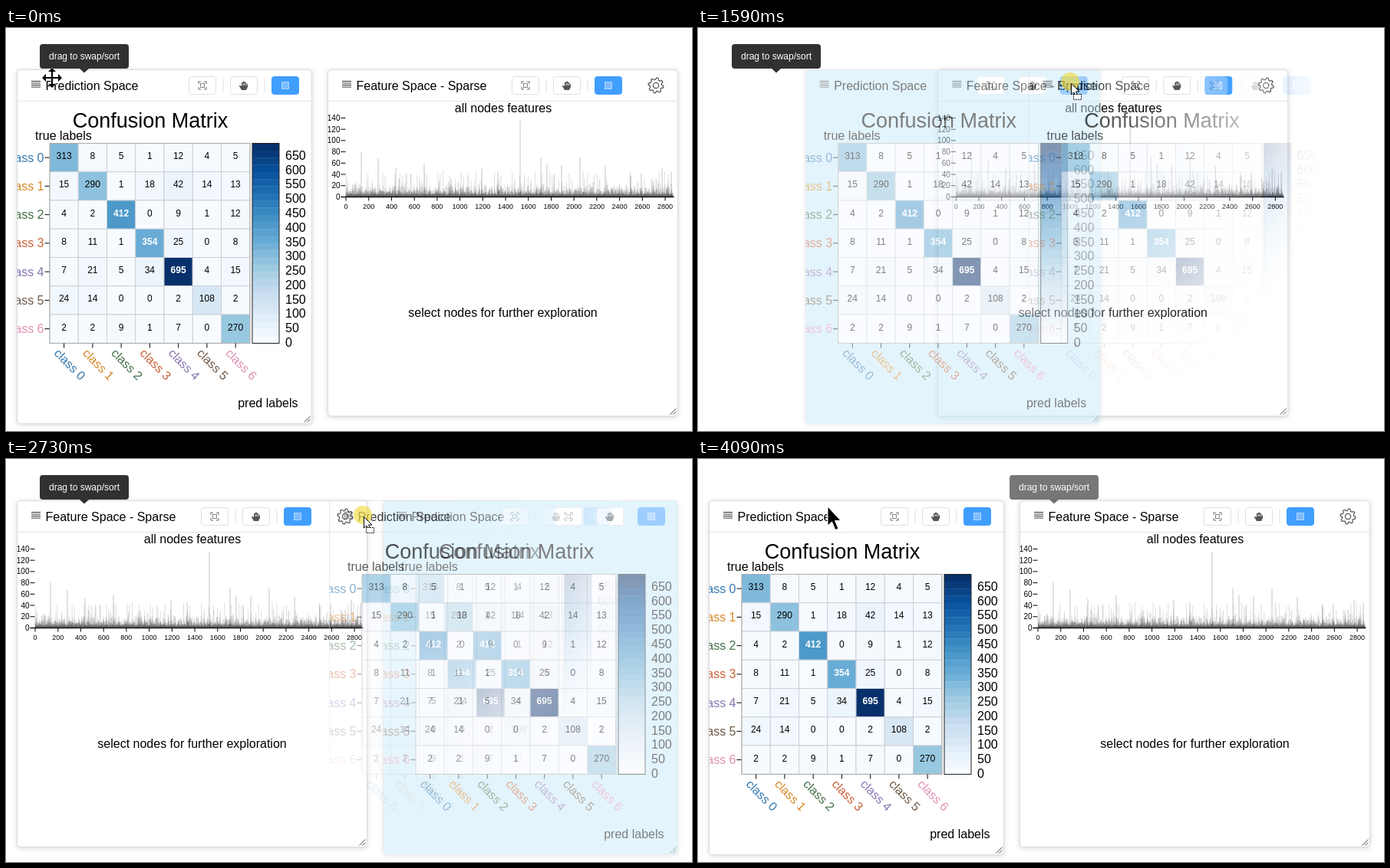
Write an HTML page that moves like this. It is 894 by 526 pixels and loops after 4160 ms.

```html
<!DOCTYPE html>
<html lang="en">
<head>
<meta charset="utf-8">
<title>Swapping dashboard panels</title>
<style>
  html, body { margin: 0; width: 100%; height: 100%; overflow: hidden; background: #fff; }
  svg { display: block; width: 894px; height: 526px; font-family: "Liberation Sans", Arial, sans-serif; }
  .card { fill: #fff; stroke: #d9dbe0; filter: drop-shadow(0 1px 3px rgba(0, 0, 0, .16)); }
  .dragged { opacity: .5; }
  .dragged .card { fill: #c8ebfb; }
  #ghost .card { fill: none; filter: none; }
</style>
</head>
<body>
<svg id="stage" viewBox="0 0 894 526">
  <defs>
    <clipPath id="clipA"><rect width="384" height="462"/></clipPath>
    <clipPath id="clipB"><rect width="456" height="452"/></clipPath>
    <radialGradient id="fade" gradientUnits="userSpaceOnUse" cx="0" cy="0" r="1"
      gradientTransform="translate(65 20) scale(330 430)">
      <stop offset="0" stop-color="#fff" stop-opacity=".78"/>
      <stop offset=".3" stop-color="#fff" stop-opacity=".54"/>
      <stop offset=".5" stop-color="#fff" stop-opacity=".39"/>
      <stop offset=".75" stop-color="#fff" stop-opacity=".17"/>
      <stop offset="1" stop-color="#fff" stop-opacity="0"/>
    </radialGradient>
    <mask id="ghostMask" maskUnits="userSpaceOnUse" x="-5" y="-5" width="400" height="480" style="mask-type: alpha">
      <rect x="-5" y="-5" width="400" height="480" fill="url(#fade)"/>
    </mask>
  </defs>
  <g id="panels"><g id="panelB"></g><g id="panelA"></g></g>
  <g id="ghost" mask="url(#ghostMask)"></g>
  <g id="tips"></g>
  <circle id="click" r="12" fill="#f2dc46" opacity=".68"/>
  <g id="cursors">
    <path id="move" fill="#000" stroke="#fff" stroke-width="1" paint-order="stroke"
      d="M0-13L5-8H1V-1H8V-5L13 0L8 5V1H1V8H5L0 13L-5 8H-1V1H-8V5L-13 0L-8-5V-1H-1V-8H-5Z"/>
    <g id="drag">
      <path fill="#fff" stroke="#000" d="M.5.5V15L4 12L6.5 17.5L9 16.5L6.5 11H11Z"/>
      <rect x="3.5" y="14.5" width="10" height="7" fill="#fff" stroke="#000" stroke-dasharray="1.5 1"/>
    </g>
    <path id="arrow" fill="#000" stroke="#fff" d="M0 0V25L5.5 20L10 30.5L14 29L9.5 18.5H17Z"/>
  </g>
</svg>
<script>
const $ = id => document.getElementById(id);
const LOOP = 4160, TOP = 54.5, LEFT = 14.5;
const times = (n, fn) => Array.from({ length: n }, (_, i) => fn(i)).join('');
const text = (x, y, s, size = 16, extra = '') =>
  `<text x="${x}" y="${y}" font-size="${size}" ${extra}>${s}</text>`;
const line = (d, extra = 'stroke="#000"') => `<path d="${d}" fill="none" ${extra}/>`;
const MID = 'text-anchor="middle"', END = 'text-anchor="end"';

// ---- shared panel frame ----
function button(x, icon, active) {
  return `<g transform="translate(${x} 9)">
    <rect width="35" height="23" rx="3" fill="${active ? '#409eff' : '#fff'}" stroke="${active ? '#409eff' : '#dcdfe6'}"/>
    <g transform="translate(17.5 11.5)">${icon}</g></g>`;
}

const expandIcon = line('M-5-2V-5H-2M2-5H5V-2M5 2V5H2M-2 5H-5V2', 'stroke="#666"') +
  '<rect x="-2.5" y="-2.5" width="5" height="5" fill="none" stroke="#888"/>';
const handIcon = '<path fill="#555" d="M-3 6L-6 1Q-6-1-3 1V-4Q-2-5-1-4V-5Q0-6 1-5V-4Q2-5 3-4V-2Q5-3 5-1V2L3 6Z"/>' +
  line('M-1-3V0M1-3V0M3-2V0', 'stroke="#fff" stroke-width=".8"');
const selectIcon =
  '<rect x="-4.5" y="-4.5" width="9" height="9" fill="#7dbcff" stroke="#d8ebff" stroke-dasharray="2 1"/>';

function frame(w, h, title, firstButton) {
  const dividers = [45, 99].map(d => `M${firstButton + d - .5} 12V29`).join('');
  return `<rect class="card" width="${w}" height="${h}" rx="4"/>` +
    line(`M0 41H${w}`, 'stroke="#e2e4e8"') +
    line('M18.5 15H30.5M18.5 17.5H30.5M18.5 20H30.5M18.5 22.5H30.5', 'stroke="#333" stroke-width="1.1"') +
    text(37, 26.5, title) + line(dividers, 'stroke="#dcdfe6"') +
    button(firstButton, expandIcon) + button(firstButton + 54, handIcon) +
    button(firstButton + 108, selectIcon, true) +
    line(`M${w - 10} ${h - 2}l8-8M${w - 6} ${h - 2}l4-4`, 'stroke="#555"');
}

// ---- confusion matrix ----
const BLUES = ['f7fbff', 'deebf7', 'c6dbef', '9ecae1', '6baed6', '4292c6', '2171b5', '08519c', '08306b']
  .map(h => [0, 2, 4].map(i => parseInt(h.slice(i, i + 2), 16)));
function blue(p) {
  const i = Math.min(7, Math.floor(p * 8)), f = p * 8 - i;
  return `rgb(${BLUES[i].map((v, k) => Math.round(v + (BLUES[i + 1][k] - v) * f))})`;
}
const MATRIX = [
  [313, 8, 5, 1, 12, 4, 5], [15, 290, 1, 18, 42, 14, 13], [4, 2, 412, 0, 9, 1, 12],
  [8, 11, 1, 354, 25, 0, 8], [7, 21, 5, 34, 695, 4, 15], [24, 14, 0, 0, 2, 108, 2], [2, 2, 9, 1, 7, 0, 270]
];
const CLASS_COLORS = ['#3478b0', '#d68728', '#437048', '#c86038', '#8a74b0', '#6f5a48', '#e090b4'];
const CELL = 37.25, GX = 42.5, GY = 96, BANDS = 28;

function matrixPanel() {
  const cells = MATRIX.map((row, r) => row.map((v, c) => {
    const x = GX + c * CELL, y = GY + r * CELL, light = v > 340;
    return `<rect x="${x}" y="${y}" width="${CELL}" height="${CELL}" fill="${blue(v / 695)}" stroke="#ccd0d6"/>` +
      text(x + CELL / 2, y + 20.5, v, 12, MID + (light ? ' fill="#fff" font-weight="bold"' : ''));
  }).join('')).join('');
  const labels = CLASS_COLORS.map((color, i) => {
    const m = (i + .5) * CELL, name = 'class ' + i, cx = GX + m;
    return text(35, GY + m + 5.5, name, 16, `${END} fill="${color}"`) +
      line(`M36 ${GY + m}H42M${cx} 357V363`) +
      text(0, 5.5, name, 16, `${MID} fill="${color}" transform="translate(${cx + 7.5} 384.5) rotate(45)"`);
  }).join('');
  const band = 261 / BANDS;
  const bar = times(BANDS, i =>
    `<rect x="306.5" y="${GY + i * band}" width="35" height="${band + .3}" fill="${blue(1 - i / (BANDS - 1))}"/>`) +
    '<rect x="306.5" y="96" width="35" height="261" fill="none" stroke="#222"/>' +
    times(14, i => text(349.5, 361.5 - i * 18.78, i * 50));
  return frame(384, 462, 'Prediction Space', 224) + '<g clip-path="url(#clipA)">' +
    text(173.5, 75.5, 'Confusion Matrix', 27, MID) + text(23.5, 91.5, 'true labels') + cells +
    '<rect x="42.5" y="96" width="261" height="261" fill="none" stroke="#aaa"/>' +
    labels + bar + text(366, 440.5, 'pred labels', 16, END) + '</g>';
}

// ---- feature chart ----
const PEAKS = [[20, 80], [42, 68], [65, 52], [102, 58], [177, 50], [198, 45], [227, 135], [254, 70],
  [262, 58], [281, 56], [305, 70], [338, 55], [385, 42], [412, 50], [424, 44]];

function featurePanel() {
  let seed = 11;
  const rand = () => (seed = seed * 16807 % 2147483647) / 2147483647;
  const x0 = 23.5, y0 = 166, unit = .736;
  const layers = Array(12).fill('');
  for (let i = 0; i < 2870; i++) {
    const tall = rand() < .07;
    const h = tall ? 10 + 36 * rand() ** 1.7 : 3 - 5 * Math.log(rand() + .01);
    layers[Math.floor(rand() * 12)] += `M${(x0 + i * .1486).toFixed(1)} ${y0}v${(-h * unit).toFixed(1)}`;
  }
  const bars = layers.map(d => line(d, 'stroke="#1c1820" stroke-opacity=".14"')).join('') +
    line(PEAKS.map(([x, h]) => `M${x0 + x} ${y0}v${-h * unit}`).join(''),
      'stroke="#1c1820" stroke-opacity=".16" stroke-width="1.6"');
  const yAxis = times(8, i => {
    const y = y0 - i * 20 * unit;
    return text(16, y + 3.5, i * 20, 10, END) + line(`M17 ${y}H23`);
  });
  const xAxis = times(15, i => {
    const x = x0 + i * 29.72;
    return text(x, 181, i * 200, 9, MID) + line(`M${x} ${y0}v5`);
  });
  const gear = 'M' + Array.from({ length: 32 }, (_, i) => {
    const r = i % 4 < 2 ? 10 : 7.6, a = (i + .5) * Math.PI / 16;
    return `${(r * Math.cos(a)).toFixed(1)} ${(r * Math.sin(a)).toFixed(1)}`;
  }).join('L') + 'Z';
  return frame(456, 452, 'Feature Space - Sparse', 240) +
    `<g transform="translate(427.5 20.5)">${line(gear, 'stroke="#555" stroke-width="1.2"')}
      <circle r="3.6" fill="none" stroke="#555" stroke-width="1.2"/></g>` +
    '<g clip-path="url(#clipB)">' + text(228.5, 55.5, 'all nodes features', 16, MID) + bars + yAxis + xAxis +
    line(`M17 ${y0}H451`, 'stroke="#111" stroke-width="1.5"') +
    text(228, 322.5, 'select nodes for further exploration', 16, MID) + '</g>';
}

function tip(x, y, w, label) {
  const m = w / 2;
  return `<g transform="translate(${x} ${y})" fill="#303133"><rect width="${w}" height="32" rx="4"/>
    <path d="M${m - 6} 32h12l-6 5.5z"/>${text(m, 20, label, 12, MID + ' fill="#fff"')}</g>`;
}

$('panelA').innerHTML = $('ghost').innerHTML = matrixPanel();
$('panelB').innerHTML = featurePanel();
$('tips').innerHTML = tip(44, 21, 116, 'drag to swap/sort') +
  tip(406, 21, 116, 'drag to swap/sort') + tip(506, 19, 83, 'reset zoom');

// ---- motion: rows are [ms, ...values] ----
const CURSOR = [[0, 60, 65], [630, 60, 65], [700, 62, 67], [840, 66, 70], [1174, 218, 75], [1582, 486, 72],
  [1860, 531, 76], [1930, 532, 77], [2540, 532, 77], [2738, 466, 75], [3282, 172, 65], [3550, 169, 62]];
const GHOST = [[840, 0, 0], [1174, 138, 3], [1582, 416.5, 0], [1930, 470, 4],
  [2540, 477, 0], [2738, 407, 0], [3282, 97.5, -11], [3550, 95, -13]];
const TIPS = [
  [[0, 1], [3260, 1], [3560, 0]],
  [[3130, 0], [3430, 1], [4080, 1], [4090, .66]],
  [[3010, 0], [3200, 1], [3550, 1], [3750, 0]]
];
const DRAGS = [[840, 1930], [2540, 3550]];
const SWAP = 1489, SWAP_BACK = 2836, SWAP_TIME = 500;

function at(table, t) {
  const i = table.findIndex(row => row[0] > t);
  if (i < 0) return table[table.length - 1].slice(1);
  if (i === 0) return table[0].slice(1);
  const a = table[i - 1], b = table[i], p = (t - a[0]) / (b[0] - a[0]);
  return a.slice(1).map((v, k) => v + (b[k + 1] - v) * p);
}

// cubic-bezier(.25, .1, .25, 1)
function ease(x) {
  if (x <= 0 || x >= 1) return x <= 0 ? 0 : 1;
  let lo = 0, hi = 1, u;
  for (let i = 0; i < 20; i++) {
    u = (lo + hi) / 2;
    if (.75 * u * (1 - u) + u ** 3 < x) lo = u; else hi = u;
  }
  return .3 * u * (1 - u) ** 2 + 3 * u * u * (1 - u) + u ** 3;
}

const place = (id, x, y) => $(id).setAttribute('transform', `translate(${x} ${y})`);
const show = (id, on) => { $(id).style.display = on ? '' : 'none'; };

function draw(time) {
  const t = time < 10 ? 0 : 18 + Math.floor((time - 10) / 68) * 68;
  const dragging = DRAGS.some(([from, to]) => t >= from && t < to);
  const swap = ease((t - SWAP) / SWAP_TIME) - ease((t - SWAP_BACK) / SWAP_TIME);

  place('panelA', LEFT + 477 * swap, TOP);
  place('panelB', 419.5 - 405 * swap, TOP);
  $('panelA').classList.toggle('dragged', dragging);
  const front = $(t >= SWAP && t < SWAP_BACK ? 'panelA' : 'panelB');
  if ($('panels').lastElementChild !== front) $('panels').append(front);

  const [gx, gy] = at(GHOST, t);
  place('ghost', LEFT + gx, TOP + gy);
  show('ghost', dragging);

  const [x, y] = at(CURSOR, t);
  place('cursors', x, y);
  place('click', x - 1, y - 2);
  show('click', dragging || (t >= 630 && t < 840) || (t >= 2460 && t < 2540));
  show('drag', dragging);
  show('arrow', t >= 3550);
  show('move', !dragging && t < 3550);

  TIPS.forEach((table, i) => { $('tips').children[i].style.opacity = at(table, t)[0]; });
}

const start = performance.now();
function tick() {
  draw((performance.now() - start) % LOOP);
  requestAnimationFrame(tick);
}
tick();
</script>
</body>
</html>
```
